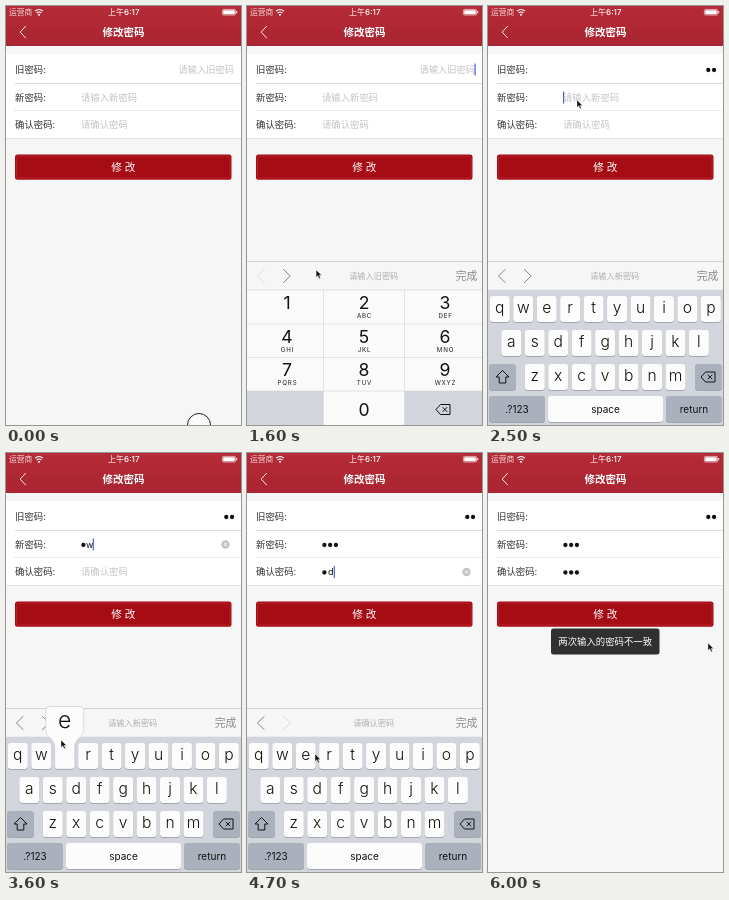
An HTML page that plays this animation: 235 px wide and 419 px high, repeating every 6100 ms.

```html
<!DOCTYPE html>
<html lang="zh">
<head>
<meta charset="utf-8">
<style>
html, body { margin: 0; width: 100%; height: 100%; overflow: hidden; background: #f6f6f6; }
svg { display: block; width: 100vw; height: 100vh; }
text { font-family: Inter, "Noto Sans CJK SC", "Noto Sans CJK", sans-serif; white-space: pre; }
</style>
</head>
<body>
<svg id="stage" viewBox="0 0 235 419">
  <defs>
    <linearGradient id="red" x2="0" y2="1">
      <stop stop-color="#b52b37"/><stop offset="1" stop-color="#a92531"/>
    </linearGradient>
  </defs>
  <g id="page"></g>
  <g id="fields"></g>
  <g id="board">
    <g id="pad"></g>
    <g id="letters"></g>
    <g id="bar"></g>
    <g id="press"></g>
  </g>
  <g id="toast"></g>
  <circle id="ring" cx="193" cy="419" r="11.5" fill="#fff" fill-opacity=".5" stroke="#222"/>
  <path id="cursor" d="M0 0v7.4l1.8-1.6 1.3 3 1.3-.6-1.3-2.8h2.4z" fill="#111" stroke="#fff" stroke-width=".4"/>
</svg>
<script>
const LOOP = 6100, STEP = 100, BOARD_H = 164;
const $ = id => document.getElementById(id);

// y is the visual middle of the text
const text = (x, y, s, size, fill, anchor = 'start', weight = 400, extra = '') =>
  `<text x="${x}" y="${y + size * .37}" font-size="${size}" fill="${fill}" text-anchor="${anchor}" font-weight="${weight}" ${extra}>${s}</text>`;
const rect = (x, y, w, h, fill, r = 0, extra = '') =>
  `<rect x="${x}" y="${y}" width="${w}" height="${h}" rx="${r}" fill="${fill}" ${extra}/>`;
const line = (d, color, w = 1, extra = '') =>
  `<path d="${d}" fill="none" stroke="${color}" stroke-width="${w}" ${extra}/>`;

function drawPage() {
  const label = (y, s) => text(9, y, s, 9.4, '#333');
  $('page').innerHTML =
    rect(0, 0, 235, 419, '#f6f6f6') +
    rect(0, 0, 235, 40, 'url(#red)') +
    text(3, 6.5, '运营商', 7.8, '#f3dadc') +
    line('M29 5.2q4-3.4 8 0M30.6 7q2.4-2 4.8 0', '#fff', 1.1) +
    '<circle cx="33" cy="8.7" r="1" fill="#fff"/>' +
    text(117.8, 6.5, '上午6:17', 8, '#fff', 'middle', 500) +
    rect(216.4, 3.4, 13.2, 5.6, 'none', 1.2, 'stroke="#fff" stroke-width=".6"') +
    rect(217.2, 4.2, 11.6, 4, '#fff', .6) + rect(230.2, 5.2, 1, 2, '#fff') +
    line('M19.8 20l-5.6 6.1 5.6 6.1', '#fff', .9) +
    text(117.4, 26.5, '修改密码', 10.5, '#fff', 'middle', 700) +
    rect(0, 48, 235, 84.5, '#fff') +
    line('M9 77.5H235', '#dcdcdc') +
    line('M9 104.5H235', '#d8d8d8', 1, 'stroke-dasharray="1 1"') +
    line('M0 132.5H235', '#e2e2e2') +
    label(63.5, '旧密码:') + label(91.5, '新密码:') + label(119, '确认密码:') +
    rect(9, 148.5, 216.5, 25.2, '#a60c14', 2.5) +
    rect(10.5, 150.2, 213.5, 21.8, 'none', 1.5, 'stroke="#bd2a34" stroke-width=".7"') +
    text(117.3, 161, '修 改', 10.6, '#fff', 'middle', 500);
}

const backspace = (x, y) =>
  line(`M${x - 7} ${y}l4.5-5h9.5v10h-9.5zM${x - .4} ${y - 2.3}l4.6 4.6m0-4.6l-4.6 4.6`, '#111', 1, 'stroke-linejoin="round"');

const cols = [0, 76.5, 157.5, 235], midX = [40, 117, 198], rows = [284, 318, 351.5, 385, 419];
const hints = ['', 'ABC', 'DEF', 'GHI', 'JKL', 'MNO', 'PQRS', 'TUV', 'WXYZ'];

function padCell(n, fill) {
  const c = n % 3, r = Math.floor(n / 3), x = midX[c], y = rows[r];
  const digit = n < 9 ? n + 1 : n === 10 ? 0 : '';
  return rect(cols[c], y, cols[c + 1] - cols[c], rows[r + 1] - y, fill) +
    text(x, n < 9 ? y + 12 : y + 18.3, digit, 17.6, '#111', 'middle') +
    (hints[n] ? text(x + .5, y + 25.3, hints[n], 6.2, '#222', 'middle', 400, 'letter-spacing=".8"') : '');
}

function drawPad() {
  let s = '';
  for (let n = 0; n < 12; n++) s += padCell(n, n === 9 || n === 11 ? '#d2d5db' : '#fafafa');
  const grid = rows.slice(0, 4).map(y => `M0 ${y}H235`).join('') + 'M76.5 284V419M157.5 284V419';
  $('pad').innerHTML = s + line(grid, '#d4d6d9', .6) + backspace(196, 403.5);
}

const key = (x, y, w, fill, s = '', size = 15.6) =>
  rect(x, y + .8, w, 26, '#94979d', 3) + rect(x, y, w, 26, fill, 3) +
  `<text x="${x + w / 2}" y="${y + (size > 12 ? 17.2 : 16.6)}" font-size="${size}" font-weight="${size > 12 ? 300 : 400}" fill="#111" text-anchor="middle">${s}</text>`;

const spots = {};

function drawLetters() {
  const grey = '#abb1bc';
  let s = rect(0, 284, 235, 135, '#d2d5db');
  ['qwertyuiop', 'asdfghjkl', 'zxcvbnm'].forEach((row, r) => {
    [...row].forEach((ch, i) => {
      const x = [11.8, 23.3, 46.8][r] + i * 23.45, y = 290 + r * 34;
      spots[ch] = [x, y];
      s += key(x - 10, y, 20, '#fcfcfd', ch);
    });
  });
  s += key(1, 358, 27, grey) + key(207, 358, 27, grey) +
    key(1, 390, 56, grey, '.?123', 10) + key(60, 390, 115, '#fcfcfd', 'space', 10) + key(178, 390, 56, grey, 'return', 10) +
    line('M14.5 364.5l6.5 6.5h-3.2v6h-6.6V371H8z', '#111', 1, 'stroke-linejoin="round"') + backspace(220, 371);
  $('letters').innerHTML = s;
}

function popup(ch) {
  const [x, y] = spots[ch];
  const d = `M${x - 15} ${y - 36.5}h30q4 0 4 4v19c0 8-9 9-9 17v19.5q0 3-3 3h-14q-3 0-3-3v-19.5c0-8-9-9-9-17v-19q0-4 4-4z`;
  return `<path d="${d}" fill="#fcfcfd" stroke="#c6c9ce" stroke-width=".6"/>` +
    `<text x="${x}" y="${y - 15}" font-size="23" font-weight="300" fill="#111" text-anchor="middle">${ch}</text>`;
}

// Form fields: focus time, blur time, and [time, character] as it appears
const fields = [
  { y: 63.5, hint: '请输入旧密码', right: true, from: 1000, to: 2400, typed: [[1900, '1'], [2100, '2']] },
  { y: 91.5, hint: '请输入新密码', from: 2400, to: 4100, typed: [[3300, 'q'], [3500, 'w'], [3700, 'e']] },
  { y: 119, hint: '请确认密码', from: 4100, to: 5300, typed: [[4500, 's'], [4700, 'd'], [4900, 'r']] }
];
const active = (f, t) => t >= f.from && t < f.to;
const presses = { 1800: '1', 2000: '2', 3200: 'q', 3400: 'w', 3600: 'e', 4400: 's', 4600: 'd', 4800: 'r' };

function drawField(f, t) {
  const on = active(f, t), chars = f.typed.filter(c => t >= c[0]), n = chars.length;
  const caret = x => on ? rect(x, f.y - 6, 1.2, 12, '#4a63d8') : '';
  if (!n) return f.right
    ? text(228, f.y, f.hint, 9.25, '#c3c3c8', 'end') + caret(227.5)
    : text(75, f.y, f.hint, 9.35, '#c3c3c8') + caret(75);
  const left = f.right ? (on ? 211.5 : 229.2) - n * 5.75 : 74.8;
  let s = '';
  chars.forEach(([, ch], i) => {
    const x = left + i * 5.75 + 2.6;
    s += on && i === n - 1
      ? text(x + .6, f.y, ch, 9, '#111', 'middle')
      : `<circle cx="${x}" cy="${f.y + .5}" r="2.15" fill="#111"/>`;
  });
  if (on) s += caret(left + n * 5.75 + .4) +
    `<circle cx="219.5" cy="${f.y}" r="4.2" fill="#c4c4c9"/>` +
    line(`M218 ${f.y - 1.5}l3 3m0-3l-3 3`, '#fff', .9);
  return s;
}

function drawBar(i) {
  const arrow = (x, dx, on) => line(`M${x} 263.2l${dx} 6.8 ${-dx} 6.8`, on ? '#86868b' : '#dedee0', 1);
  $('bar').innerHTML = rect(0, 255, 235, 29, '#f6f6f6') +
    line('M0 255.5H235', '#d2d2d2') + line('M0 283.8H235', '#dadada', .5) +
    arrow(17.4, -7, i > 0) + arrow(36.2, 7, i < 2) +
    text(126.7, 270, fields[i].hint, 8.2, '#b0b0b4', 'middle') +
    text(208.7, 269.7, '完成', 10.8, '#8a8a8e');
}

const path = [
  [500, 197, 78], [600, 194, 69], [1300, 194, 69], [1700, 46, 300], [1800, 46, 300], [1900, 122, 309],
  [2000, 123, 310], [2100, 123, 310], [2400, 89, 94], [2900, 89, 94], [3200, 14, 299], [3300, 14, 299],
  [3400, 36, 297], [3600, 55, 287], [3700, 55, 287], [4000, 92, 123], [4100, 92, 123], [4400, 48, 335],
  [4600, 72, 332], [4700, 68, 301], [4800, 78, 300], [4900, 78, 300], [5200, 218, 270], [5300, 218, 270],
  [5600, 220, 163], [5900, 220, 163], [6000, 220, 190]
];

function pointer(t) {
  const i = path.findIndex(p => p[0] >= t);
  if (i <= 0) return path[0].slice(1);
  const [t0, x0, y0] = path[i - 1], [t1, x1, y1] = path[i], u = (t - t0) / (t1 - t0);
  const k = u * u * (3 - 2 * u);
  return [x0 + (x1 - x0) * k, y0 + (y1 - y0) * k];
}

// Remaining share of a decelerating slide
const slide = (t, start) => (1 - Math.min(1, Math.max(0, (t - start) / 416))) ** 3;
const show = (id, on) => $(id).setAttribute('visibility', on ? 'inherit' : 'hidden');

function render(t) {
  const i = t < 2400 ? 0 : t < 4100 ? 1 : 2;
  const drop = BOARD_H * (t < 5300 ? slide(t, 1000) : 1 - slide(t, 5300));
  $('fields').innerHTML = fields.map(f => drawField(f, t)).join('');
  drawBar(i);
  $('board').setAttribute('transform', `translate(0 ${drop})`);
  show('board', t >= 1000 && t < 5750);
  show('pad', i === 0);
  show('letters', i > 0);
  const ch = presses[t];
  $('press').innerHTML = !ch ? '' : spots[ch] ? popup(ch) : padCell(ch - 1, '#d0d4dc');
  show('toast', t >= 5800);
  show('ring', t < 100);
  show('cursor', t >= 500);
  $('cursor').setAttribute('transform', `translate(${pointer(t).join(' ')})`);
}

drawPage();
drawPad();
drawLetters();
$('toast').innerHTML = rect(63, 175.5, 108.5, 26, '#303030', 2.5) +
  text(117.2, 188.8, '两次输入的密码不一致', 9.4, '#fff', 'middle');

const start = performance.now();
let last = -1;
function tick() {
  const t = Math.floor((performance.now() - start) % LOOP / STEP) * STEP;
  if (t !== last) render(last = t);
  requestAnimationFrame(tick);
}
tick();
</script>
</body>
</html>
```
